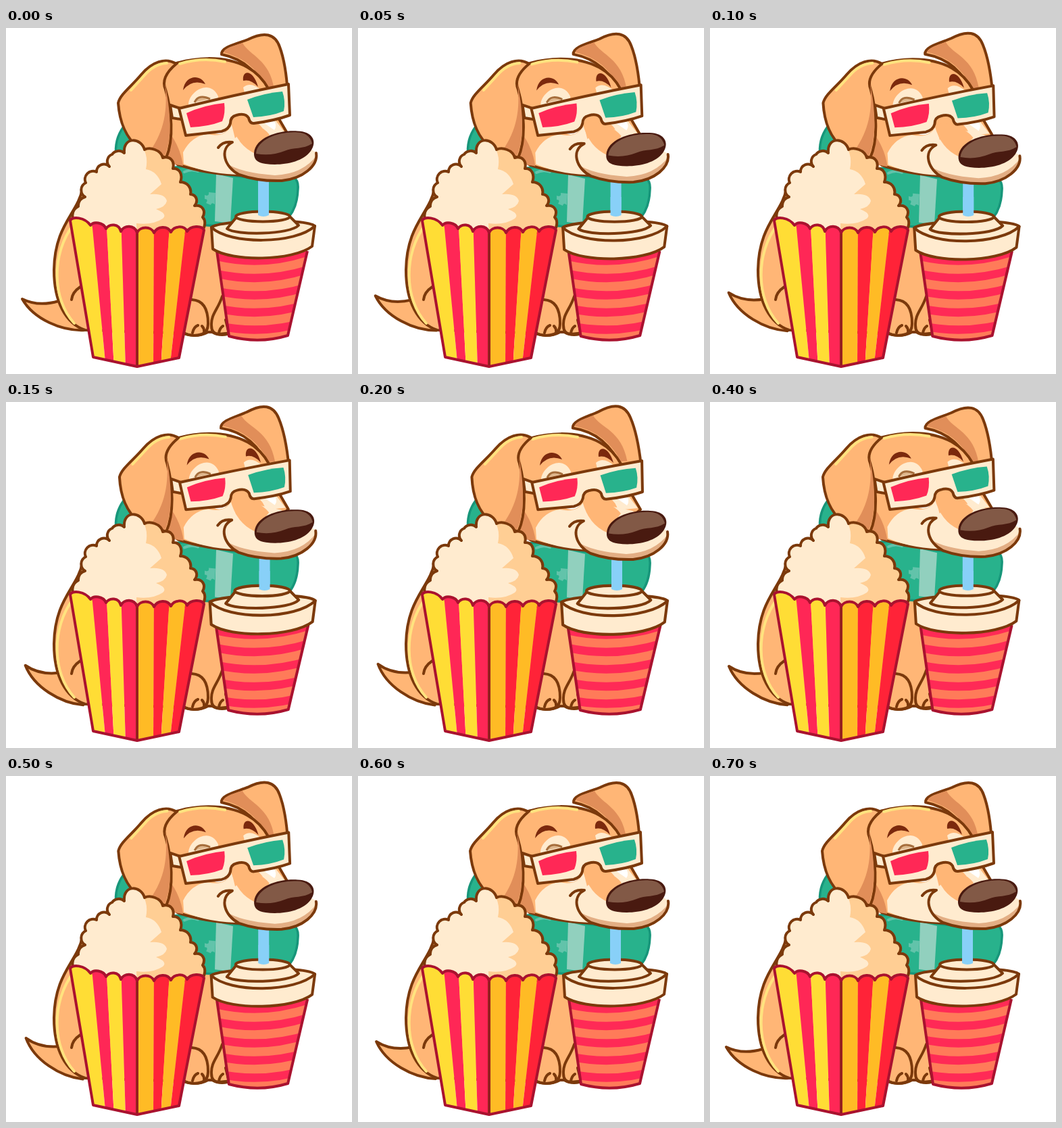
An HTML page for the animation above (750 ms loop, 512 by 512 pixels).

```html
<!DOCTYPE html>
<html lang="en">
<head>
<meta charset="utf-8">
<title>Dog with popcorn</title>
<style>
html, body { margin: 0; width: 100%; height: 100%; overflow: hidden; background: #fff; }
svg { display: block; width: 100vw; height: 100vh; }
.line { stroke: #7b390b; stroke-width: 4; stroke-linejoin: round; stroke-linecap: round; }
.none { fill: none; }
.fur { fill: #ffb676; }
.shade { fill: #e18e59; }
.cream { fill: #ffebcf; }
.glow { fill: none; stroke: #ffe37f; stroke-width: 4; stroke-linecap: round; }
.green { fill: #28b28c; }
.edge { stroke: #17967a; stroke-width: 3.5; stroke-linejoin: round; }
.red { stroke: #a9122f; stroke-width: 4; stroke-linejoin: round; }
.straw { fill: #88d0f8; }
</style>
</head>
<body>
<svg viewBox="0 0 512 512">
<defs>
  <clipPath id="cupClip"><path d="M312 328L330 456Q374 468 417 455L446 328Z"/></clipPath>
  <clipPath id="bucketClip"><path id="bucketShape" d="M95 285C97 278 117 280 125 292C129 286 144 287 148 297C153 289 167 289 170 301C174 291 191 291 194 303C198 293 215 293 219 303C224 293 239 292 244 302C249 292 264 292 268 301C273 292 290 292 293 299L256 488L194 501L129 487Z"/></clipPath>
  <clipPath id="popClip"><path id="popShape" d="M105 290A15 15 0 0 1 107 264A13 13 0 0 1 117 250A12 12 0 0 1 118 229A12 12 0 0 1 134 213A11 11 0 0 1 153 205A11 11 0 0 1 157 187A12 12 0 0 1 175 185C173 160 200 162 205 180C213 176 229 180 232 192C243 189 250 197 247 208C257 207 262 217 258 228C268 228 275 236 273 246C282 247 285 256 279 263C291 261 296 271 291 280Q298 287 290 302L194 304Z"/></clipPath>
</defs>

<path id="tail" class="line fur" d="M24 401Q48 413 78 404L117 447C83 449 41 431 24 401Z"/>

<g id="body">
  <path class="line fur" d="M113 238C106 275 72 291 71 358C71 405 88 437 117 447L263 452Q282 459 299 450L305 450Q319 458 336 450L350 270Z"/>
  <path class="glow" d="M99 292C68 333 67 400 101 437"/>
  <path class="line none" d="M110 383Q98 391 97 402M275 402C294 403 299 419 299 437Q299 450 290 453Q273 458 262 450M276 451Q278 442 284 440M293 452Q294 445 290 441M320 397C314 416 303 424 304 440Q304 453 315 453L334 451M315 452Q316 444 321 441M330 452L325 432"/>
</g>

<path class="green edge" d="M174 146Q160 165 163 190L180 210L214 190Z"/>
<g id="scarf">
  <path class="green edge" d="M240 208Q263 203 282 207Q345 226 426 221Q433 226 432 238Q431 270 413 285Q350 296 280 291Z"/>
  <path fill="#91d0be" d="M311 216L336 222L332 289L309 286Z"/>
  <path fill="#62c3aa" d="M294 247Q301 250 300 243L310 244L309 261Q304 257 303 262L296 259Q300 253 294 253Z"/>
  <path fill="none" stroke="#62c3aa" stroke-width="4" stroke-linecap="round" d="M264 213Q274 208 284 212"/>
</g>

<rect id="straw" class="straw" x="373" y="222" width="16" height="58"/>

<g id="farEar">
  <path class="line fur" d="M319 39C318 28 343 23 358 17C382 5 398 8 405 28C411 44 415 64 417 98L390 104C374 66 353 46 319 39Z"/>
  <path class="shade" d="M322 36C324 29 341 25 350 22C360 41 391 46 397 92L388 92C371 59 353 45 322 36Z"/>
</g>

<g id="head">
  <path class="line fur" d="M230 60C276 40 326 41 357 58Q377 69 389 91L403 133L417 157L350 218Q293 216 254 202L225 180Z"/>
  <path class="shade" d="M238 150Q258 174 262 204L240 200Z"/>
  <path class="glow" d="M257 53Q290 43 324 50"/>
  <path class="cream" d="M270 112C272 93 302 75 314 101L313 116L270 124ZM351 88Q362 78 379 93L354 100ZM262 184Q274 160 298 157Q325 163 334 143L352 217Q300 217 263 201ZM370 139L399 137L413 155L383 158Q382 147 370 139Z"/>
  <path fill="#fff" d="M304 154Q319 162 329 149ZM381 140L396 137Q402 144 397 151Z"/>
  <path fill="#dfb78d" stroke="#a66e3c" stroke-width="3" d="M279 110Q285 97 302 105"/>
</g>
<g fill="#7b290d">
  <path id="browL" d="M262 92C265 69 288 68 295 83Q275 75 262 92Z"/>
  <path id="browR" d="M351 78C349 61 366 61 373 87Q362 75 351 78Z"/>
</g>

<g id="muzzle">
  <path class="cream" d="M329 172C309 195 330 222 400 226C439 226 464 198 459 184L407 154L360 144Z"/>
  <path fill="#e3ae84" d="M326 200Q346 214 398 218Q440 216 460 188C457 214 433 227 400 226Q340 223 326 200Z"/>
  <path class="fur" d="M333 140C348 131 377 142 390 158L369 186Q342 174 333 140Z"/>
  <path class="line none" d="M314 177Q321 167 335 169C315 179 323 206 345 217Q372 227 408 226C439 223 462 204 459 185"/>
</g>
<g id="nose">
  <path fill="#491a10" d="M367 185C369 161 405 151 431 152.500C454 153 461 168 451 182C438 200 406 204 384 201Q366 199 367 185Z"/>
  <path fill="#825946" d="M370 186C372 164 405 153 431 154.500Q449 155 453 171C440 180 425 176 412 182Q392 190 370 186Z"/>
</g>

<g id="glasses">
  <path class="line cream" d="M243 114L258 119L264 136L246 133Z"/>
  <path class="line cream" d="M256 119Q338 99 418 83L420 129Q398 137 367 141Q361 142 359 133Q354 125 341 129Q332 131 332 141Q330 150 319 153L266 159Z"/>
  <path fill="#ff2856" d="M267 126Q293 114 323 111Q325 126 320 138Q299 146 273 147Z"/>
  <path class="green" d="M357 106Q383 96 409 94Q414 108 411 123Q391 131 366 132Z"/>
</g>

<g id="nearEar">
  <path class="line fur" d="M252 53C236 43 216 50 200 69C186 86 169 98 166 111C168 139 178 163 196 177L237 192C249 164 245 121 236 91Q228 73 252 53Z"/>
  <path class="shade" d="M235 82C240 121 234 152 214 181L235 189C247 163 243 119 235 82Z"/>
  <path class="glow" d="M238 52Q219 53 204 71L185 92"/>
</g>

<g id="popcorn" clip-path="url(#popClip)">
  <path class="cream" d="M90 150H310V310H90Z"/>
  <path fill="#ffce94" d="M202 176Q211 190 207 209Q224 212 230 231L213 246Q235 244 238 256Q236 265 222 268Q240 275 232 282Q217 292 193 289L194 310H310V170Z"/>
</g>
<use href="#popShape" class="line none"/>

<g clip-path="url(#bucketClip)" id="bucket"></g>
<path stroke="#96201f" stroke-width="4" d="M194 302V500"/>
<use href="#bucketShape" class="red none"/>

<g id="cup">
  <g clip-path="url(#cupClip)">
    <path fill="#ff2a56" d="M300 320H460V470H300Z"/>
    <g id="stripes" fill="none" stroke="#ff7b59" stroke-width="13"></g>
  </g>
  <path class="red none" d="M312 330L330 456Q374 468 417 455L446 330"/>
  <g id="lid" class="line cream">
    <path d="M304 295C318 284 444 281 457 293L453 323C424 345 334 346 306 327Z"/>
    <path class="none" d="M304 295C331 321 429 320 457 293"/>
    <path d="M341 280L327 297C340 307 420 306 433 292L419 278Z"/>
    <ellipse cx="380" cy="279" rx="40" ry="7.500"/>
  </g>
</g>
<path id="sip" class="straw" d="M373 250H389V277Q381 281 373 277Z"/>
</svg>

<script>
const $ = id => document.getElementById(id);

// Tapering bucket stripes, from rim x to base x
const rim = [90, 126, 148, 170, 194, 219, 243, 268, 300];
const base = [122, 148, 160, 177, 194, 218, 229, 242, 264];
const paint = ['#ffdd35', '#ff2756', '#ffdd35', '#ff2756', '#ffbb25', '#ff2338', '#ffbb25', '#ff2338'];
$('bucket').innerHTML = paint.map((c, i) =>
  `<path fill="${c}" d="M${rim[i]} 275H${rim[i + 1]}L${base[i + 1]} 505H${base[i]}Z"/>`).join('');

$('stripes').innerHTML = [0, 1, 2, 3, 4].map(i => {
  const y = 348 + i * 25.5;
  return `<path d="M300 ${y}Q380 ${y + 22} 460 ${y - 8}"/>`;
}).join('');

// Keys are 100 ms apart
const nod = [0, .6, 1, .68, .4, .12, 0, 0, 0];
const wag = [0, .7, 1, .7, .75, 1, .6, 0, 0];
const at = (keys, t) => {
  const i = Math.floor(t / 100), u = t / 100 - i;
  return keys[i] + (keys[i + 1] - keys[i]) * u;
};
const move = (id, value) => $(id).setAttribute('transform', value);

function pose(t) {
  const p = at(nod, t), w = at(wag, t);
  move('tail', `rotate(${9.5 * w} 106 428)`);
  move('farEar', `translate(${p} ${-5 * p}) rotate(${-3 * p} 405 84)`);
  move('nearEar', `translate(${5.5 * p} 0) skewX(${-1.6 * p})`);
  move('head', `translate(${p} ${2 * p})`);
  move('browL', `translate(${7 * p} ${2 * p})`);
  move('browR', `translate(${5 * p} ${3 * p})`);
  move('muzzle', `translate(${-p} ${7 * p})`);
  move('nose', `translate(${p} ${8.5 * p})`);
  move('glasses', `translate(${p} 0) rotate(${1.4 * p} 257 130)`);
  move('scarf', `translate(0 ${3 * p})`);
  for (const id of ['straw', 'sip']) move(id, `translate(${2 * p} 0)`);
  move('cup', `translate(${-9.5 * p} 0) scale(${1 + .025 * p} 1)`);
  move('lid', `translate(${-p} ${-13.5 * p}) scale(1 ${1 + .05 * p})`);
}

function frame(now) {
  pose(Math.floor(now % 750 / 50) * 50);
  requestAnimationFrame(frame);
}
requestAnimationFrame(frame);
</script>
</body>
</html>
```
